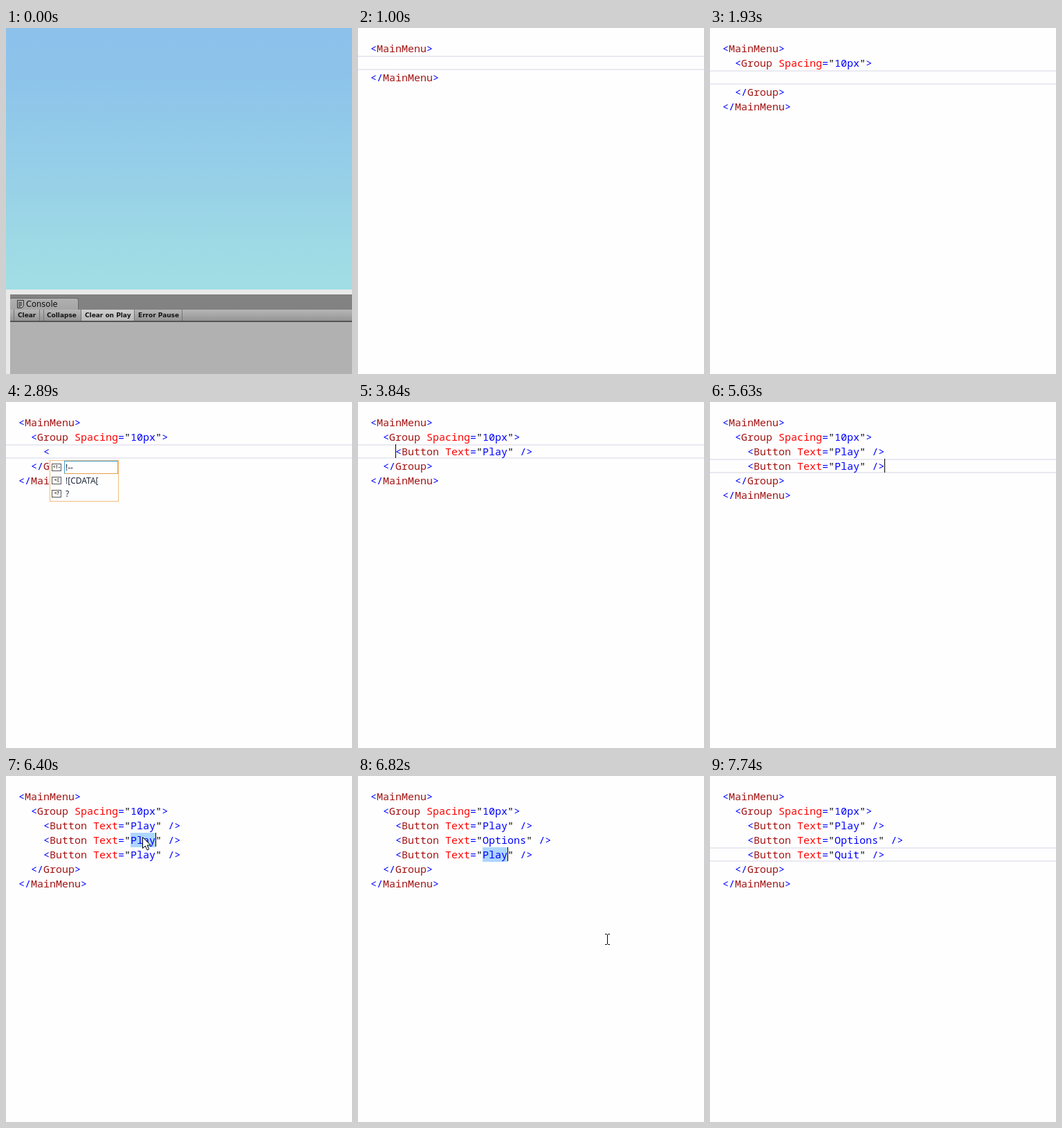
These frames come from a looping animation (500x500 px, 8000 ms). An HTML page:

```html
<!DOCTYPE html>
<html lang="en">
<head>
<meta charset="utf-8">
<title>Menu markup</title>
<style>
html, body { margin: 0; width: 100%; height: 100%; overflow: hidden; }
body { position: relative; background: #fefefe; }
body *, body { box-sizing: border-box; }
[hidden] { display: none !important; }
.abs, #game *, #editor > * { position: absolute; }

#game { position: absolute; inset: 0; background: #e9e9e9; }
#sky { left: 0; top: 0; width: 500px; height: 378px;
  background: linear-gradient(#8cc1ec 0, #8dc3ea 18%, #92cae9 40%, #98d1e7 62%, #9edae5 84%, #a1dee4); }
#panel { left: 6px; top: 385px; width: 494px; height: 115px; background: #b1b1b1; }
#tabs { left: 0; top: 0; width: 494px; height: 22px; background: #828282; }
#tab { left: 0; top: 5px; width: 99px; height: 17px; border: 1px solid #686868; border-width: 1px 1px 0 0;
  border-radius: 2px 4px 0 0; background: linear-gradient(#b0b0b0, #a5a5a5); }
#tab svg { left: 10px; top: 2px; }
#tab span { left: 23px; top: 0; font: 11.5px/17px "DejaVu Sans", sans-serif; color: #111; }
#bar { left: 0; top: 22px; width: 494px; height: 18px; border-bottom: 2px solid #555;
  background: linear-gradient(#b7b7b7, #949494); }
#bar i { top: 0; width: 1px; height: 16px; background: #747474; }
#bar b { top: 0; font: bold 9px/17px "DejaVu Sans", sans-serif; color: #151515; white-space: pre; }
#on { left: 103px; top: 0; width: 76px; height: 16px; background: linear-gradient(#d0d0d0, #b9b9b9); }

#editor { position: absolute; inset: 0; background: #fefefe; }
#row { left: 0; width: 500px; height: 21px; border: solid #e9e9f2; border-width: 2px 0; }
#sel { height: 21px; background: #add6ff; }
#caret { width: 1px; height: 20px; background: #000; }
#code { left: 18px; top: 19px; margin: 0; font: 15px/21px "Noto Sans Mono", monospace; color: #00f; }
#code .tag { color: #a31515; }
#code .attr { color: #f00; }
#code .quote { color: #000; }
#popup { left: 63px; top: 84px; width: 100px; height: 60px; background: #fefefe; border: 1px solid #f0bd80; }
#popup div { position: absolute; left: 20px; width: 78px; height: 19px; padding-left: 2px;
  font: 12px/19px "Noto Sans", sans-serif; color: #1e2a3a; }
#popup div:first-child { border: 1px solid; border-color: #3f9fd0 #e8a04c #e8a04c #3f9fd0; padding-left: 1px; line-height: 18px; }
#popup i { position: absolute; left: -18px; top: 4px; width: 14px; height: 11px; border: 1px solid #555;
  font: bold 7px/8px "Noto Sans Mono", monospace; letter-spacing: -.6px; text-align: center; color: #333; white-space: nowrap; }
#popup div:first-child i { left: -19px; top: 3px; }
</style>
</head>
<body>
<div id="editor">
  <div id="row"></div>
  <div id="sel"></div>
  <pre id="code"></pre>
  <div id="caret"></div>
  <div id="popup">
    <div style="top:0"><i>&lt;!-</i>!--</div>
    <div style="top:19px"><i>&lt;[</i>![CDATA[</div>
    <div style="top:38px"><i>&lt;?</i>?</div>
  </div>
  <svg id="arrow" width="13" height="20" style="left:197px;top:88px">
    <path d="M.5 .5V16.5L4.3 13L7 19L9.6 17.9L7 12H12Z" fill="#fff" stroke="#000"/>
  </svg>
  <svg id="beam" width="7" height="16">
    <path d="M0 .5H2.5L3.5 1.5L4.5 .5H7M3.5 1V15M0 15.5H2.5L3.5 14.5L4.5 15.5H7" fill="none" stroke="#000"/>
  </svg>
</div>
<div id="game">
  <div id="sky"></div>
  <div id="panel">
    <div id="tabs"></div>
    <div id="tab">
      <svg width="10" height="12"><path d="M.5 .5H9.5V8.5L7 11.5H.5ZM2 3.5H7M2 5.5H7M2 7.5H7M2 9.5H5" fill="none" stroke="#333"/></svg>
      <span>Console</span>
    </div>
    <div id="bar">
      <div id="on"></div>
      <i style="left:5px"></i><i style="left:42px"></i><i style="left:48px"></i>
      <i style="left:102px"></i><i style="left:179px"></i><i style="left:248px"></i>
      <b style="left:11px">Clear</b><b style="left:53px">Collapse</b>
      <b style="left:108px">Clear on Play</b><b style="left:185px">Error Pause</b>
    </div>
  </div>
</div>
<script>
const LOOP = 8000, LEFT = 18, TOP = 19, CHAR = 9, LINE = 21;
const $ = id => document.getElementById(id);
const button = text => `<Button Text="${text}" />`;
const play = button('Play');
const menu = (...items) => ['<MainMenu>', '  <Group Spacing="10px">',
  ...items.map(s => '    ' + s), '  </Group>', '</MainMenu>'];
const empty = ['<MainMenu>', '', '</MainMenu>'];
const three = menu(play, play, play);
const options = menu(play, button('Options'), play);

// row: current line; caret: [line, column]; sel: [line, from, to]
const steps = [
  { t: 0, game: true },
  { t: 1000, code: empty, row: 1 },
  { t: 1560, code: empty, row: 1, caret: [1, 2] },
  { t: 1930, code: menu(''), row: 2 },
  { t: 2390, code: menu(''), row: 2, caret: [2, 4] },
  { t: 2890, code: menu('<'), row: 2, popup: true },
  { t: 3390, code: menu('<Button'), row: 2 },
  { t: 3590, code: menu('<Button T'), row: 2, caret: [2, 13] },
  { t: 3840, code: menu(play), row: 2, caret: [2, 4] },
  { t: 4430, code: menu(play), sel: [2, 4, 26], caret: [2, 4] },
  { t: 4860, code: menu(play), sel: [2, 4, 26] },
  { t: 5240, code: menu(play), row: 2, caret: [2, 26] },
  { t: 5510, code: menu(play, ''), row: 3, caret: [3, 4] },
  { t: 5630, code: menu(play, play), row: 3, caret: [3, 26] },
  { t: 5880, code: menu(play, play, ''), row: 4, caret: [4, 4] },
  { t: 6000, code: three, row: 4, caret: [4, 26] },
  { t: 6400, code: three, sel: [3, 18, 22], caret: [3, 22], arrow: true },
  { t: 6550, code: three, sel: [3, 18, 22], caret: [3, 22], beam: [287, 162] },
  { t: 6670, code: options, row: 3 },
  { t: 6820, code: options, sel: [4, 18, 22], caret: [4, 22], beam: [357, 228] },
  { t: 6970, code: options, sel: [4, 18, 22] },
  { t: 7590, code: options, sel: [4, 18, 22], caret: [4, 22] },
  { t: 7740, code: menu(play, button('Options'), button('Quit')), row: 4 }
];

const span = (kind, s) => `<span class="${kind}">${s}</span>`;
const esc = s => s.replace(/</g, '&lt;');
const paint = line => line.replace(/(<\/?)(\w*)|"(\w*)"|(\w+)/g, (all, open, tag, value, attr) =>
  open ? esc(open) + span('tag', tag)
  : attr ? span('attr', attr)
  : span('quote', '"') + value + span('quote', '"'));

function place(id, pos) {
  const el = $(id);
  el.hidden = !pos;
  el.style.display = pos ? '' : 'none';
  if (pos) {
    el.style.left = pos[0] + 'px';
    el.style.top = pos[1] + 'px';
  }
}
const cell = (line, col) => [LEFT + col * CHAR, TOP + line * LINE];
const toggle = (id, on) => { $(id).style.display = on ? '' : 'none'; };

function show(s) {
  toggle('game', s.game);
  $('code').innerHTML = (s.code || []).map(paint).join('\n');
  place('row', s.row && [0, TOP + s.row * LINE]);
  place('caret', s.caret && cell(...s.caret));
  place('sel', s.sel && cell(s.sel[0], s.sel[1]));
  if (s.sel) $('sel').style.width = (s.sel[2] - s.sel[1]) * CHAR + 'px';
  place('beam', s.beam);
  toggle('popup', s.popup);
  toggle('arrow', s.arrow);
}

let shown;
function tick() {
  const t = performance.now() % LOOP;
  const step = steps.filter(s => s.t <= t).pop();
  if (step !== shown) show(shown = step);
  requestAnimationFrame(tick);
}
tick();
</script>
</body>
</html>
```
